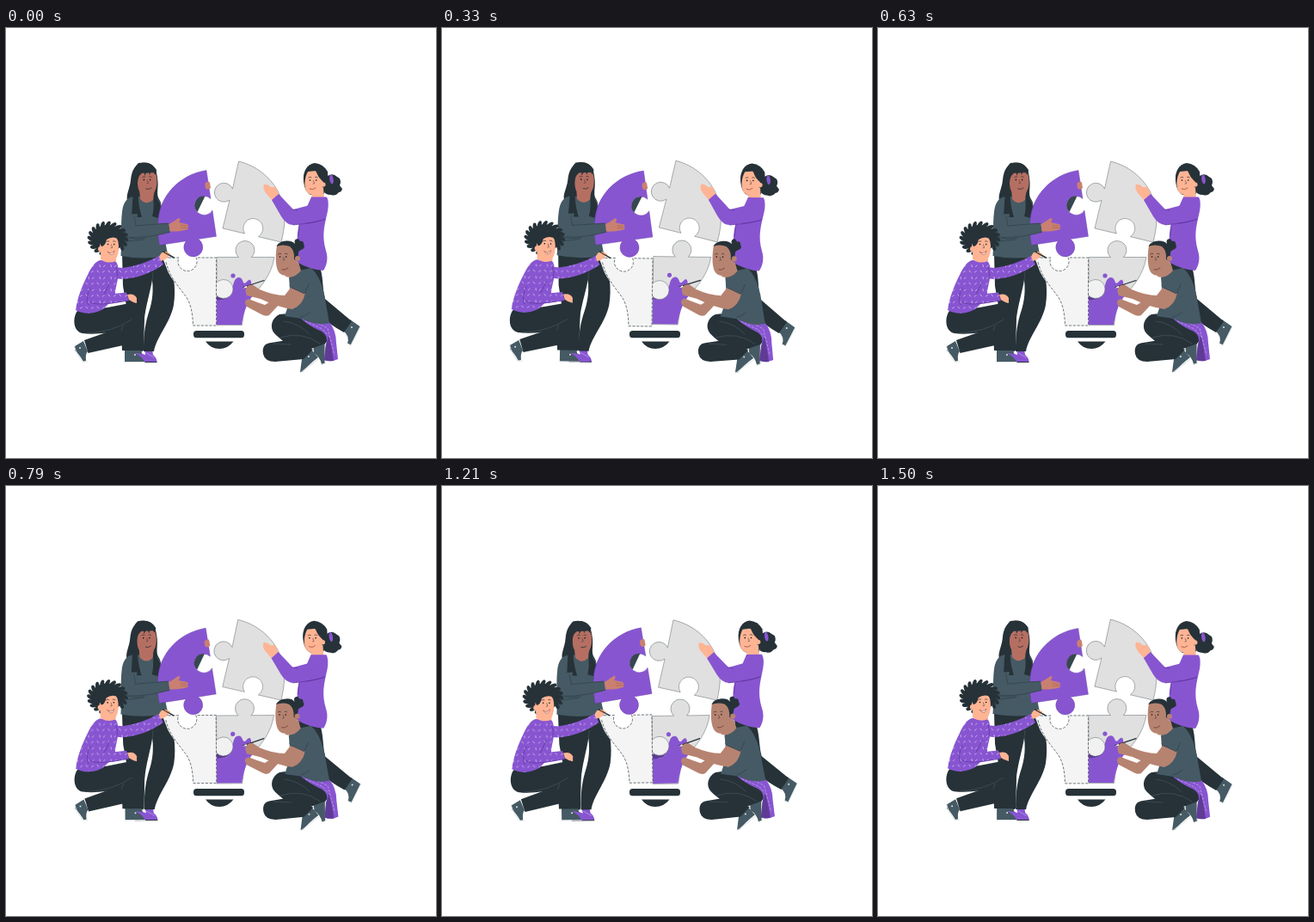
Recreate the animation shown at these times as an HTML page. Size 500 by 500 pixels, loop 1.54 s.

```html
<!DOCTYPE html>
<html lang="en">
<head>
<meta charset="utf-8">
<title>Team building a light bulb</title>
<style>
html, body { margin: 0; width: 100%; height: 100%; overflow: hidden; background: #fff; }
svg { display: block; width: 100vw; height: 100vh; }
.dark { fill: #263238; }
.slate { fill: #455a64; }
.purple { fill: #8855d1; }
.shade { fill: #5f3b96; }
.grey { fill: #e0e0e0; stroke: #59636a; stroke-width: .5; }
.paper { fill: #f4f4f4; }
.dash { fill: none; stroke: #37434a; stroke-width: .7; stroke-dasharray: 3.2 1.6; }
.line { fill: none; stroke: #263238; stroke-width: .8; stroke-linecap: round; stroke-linejoin: round; }
.fold { fill: none; stroke: #2c3c45; stroke-width: .6; stroke-linecap: round; }
.crease { fill: none; stroke: #5c359b; stroke-width: .7; stroke-linecap: round; }
.seam { fill: none; stroke: #536169; stroke-width: .5; stroke-linecap: round; }
.sole { fill: none; stroke: #dfe4e6; stroke-width: 1; stroke-linecap: round; }
.light { fill: #ffb494; }
.tan { fill: #b78371; }
.brown { fill: #b56f62; }
.hand { fill: #c98071; }
</style>
</head>
<body>
<svg viewBox="0 0 500 500" preserveAspectRatio="xMidYMid meet">
<defs>
  <pattern id="flecks" width="13" height="14" patternUnits="userSpaceOnUse">
    <rect width="13" height="14" fill="#8855d1"/>
    <path d="M2 2l1.6 2M8.5 4l1.8-1.2M5 9.5l.4 2.2M11 10l-1.6 1.6" stroke="#d9c6f4" stroke-width=".8" stroke-linecap="round"/>
  </pattern>
  <g id="eyes">
    <circle cx="-3.5" cy="0" r=".9"/><circle cx="5" cy="0" r=".9"/>
    <path class="line" d="M-5.5 -3.6q2-1.5 3.6-.5M3.6-4.2q1.8-1 3.2.4"/>
    <path class="line" d="M1.2 .5l1.3 4-1.8.4" style="stroke-width:.6"/>
  </g>
</defs>

<!-- standing woman with the purple quarter -->
<g data-pivot="189 273">
  <path class="purple" d="M150 378q6-2 9 1l14 5q3 2 2 4.500h-25z"/>
  <path class="purple" d="M161 374l9-1 1 7q4 3 4.500 8h-12z"/>
  <path class="sole" d="M151 381l12 4M163 378l9 5" style="stroke:#c9b1ee;stroke-width:.6"/>
  <path class="dark" d="M149 388h26.500v1H149z"/>
  <path class="dark" d="M135 262L187 263C195 281 198 303 195 322C191 343 175 359 172 376L160 376C160 360 161 348 165 334C169 322 172 310 170 293C168 306 162 324 160.500 342L159 376L149 376L136 300Z"/>
  <path class="seam" d="M170 293L171 284"/>
  <path class="dark" d="M161 156.500C150 157 146 166 145 177C144 188 138 195 142 203C146 207 145 213 147 220L182 221C180 211 182 205 178 199C174 193 178 186 176 174C175 163 171 156.500 161 156.500Z"/>
  <path class="slate" d="M148 196C140 197 136 204 135 214C133 230 135 247 133.500 265Q160 270 189 265C184 250 184 230 180 205C178 198 174 196 170 196Z"/>
  <path class="brown" d="M155 186L173 188L171 200Q163 207 156 199Z"/>
  <path class="brown" d="M154 169C152 180 153 189 157 192C162 198 171 196 174 188C176 182 176 176 174 168Z"/>
  <path class="dark" d="M154 157C146 164 147 181 148 188L146 220L158 220C155 210 153 199 154 190C152 182 153 176 155 172L161 165L161 172L165 165L167 171L169 165L174 171L175 165C171 158 163 155 154 157Z"/>
  <path class="dark" d="M174 188C169 197 174 206 170 219L181 222C181 212 180 204 176 199Z"/>
  <use href="#eyes" transform="translate(163.4 176.500) scale(.85)"/>
  <path class="line" d="M163 187q3.500 1.500 6-1"/>
  <path class="fold" d="M140 243Q149 247 162 244M142 248l18-2"/>

  <path class="purple" d="M233 165.500C201 170.500 178.500 196 177 224C175.500 233 177 244 178.500 252.500L209.500 247.800A11 11 0 1 0 223.500 245.600L244.500 242.300L240 212A11 11 0 1 1 238 198.500Z" stroke="#5f3aa5" stroke-width=".4"/>
  <path d="M231.500 195.400A11 11 0 0 0 222.500 214Z" fill="#37474f"/>
  <path class="hand" d="M232 180q4-3 5 0l1 6q-3 2.500-5.500 1q-2-4-.5-7z"/>

  <path class="slate" d="M137 217C135 230 137 240 144 243C158 245 176 241 191 237.500L189 227C176 227 163 229 151 230L153 216Z"/>
  <path class="fold" d="M151 230L189 227M149 219l2 11M144 243.500q20 1 46-6"/>
  <path class="hand" d="M189.500 228C194 226 197 223 201 221Q204 221 201 226L210 228Q213 229.500 211.500 232L212 234Q203 237 190.500 236.500Z"/>
  <path d="M203 229.500l7 .7M203 232.500l8-.3" stroke="#9f5f51" stroke-width=".6"/>
</g>

<!-- painted quarter, moves with the crouching man -->
<g data-pivot="314 323">
  <path class="grey" d="M245 266.500H270.500A11 11 0 1 1 285.500 266.500H312C309 286 297 301 284 314C277 323 276 335 274.500 345.500H245Z"/>
  <path class="purple" d="M245 315C252 318 260 315 262 307C264 302 264 294 268 291C273 288 275 293 276 296C279 299 281 291 284 293C287 296 283 301 287 304L288 310C278 322 276 334 274 345H245Z"/>
  <circle class="purple" cx="264" cy="288" r="2.600"/>
  <path class="shade" d="M245 311L262 306Q260 318 245 316Z"/>
</g>

<!-- socket -->
<rect class="dark" x="218" y="352" width="59" height="8.300" rx="3.500"/>
<path class="dark" d="M232 364.500H264.500Q258 373 248 373Q238 373 232 364.500Z"/>

<!-- kneeling woman with the sketched quarter -->
<g data-pivot="170 307">
  <path class="paper" d="M182 267L201 267A11 11 0 1 0 221 267L244.500 267V346H217.500C217 332 215 320 209 312C202 302 190 290 187 280Z"/>
  <path class="grey" style="fill:#f1f1f1" d="M244.500 296.500A11 11 0 1 1 244.500 310.500"/>
  <path d="M201 267A11 11 0 1 0 221 267Z" fill="#fff"/>
  <path class="dash" d="M184 267H201A11 11 0 1 0 221 267H244.500V346H217.500C217 332 215 320 209 312C202 302 190 290 186 272"/>

  <path class="slate" d="M80 370L90 364L95 376Q92 379 93 387L90 388Q85 379 80 375Z"/>
  <path class="sole" d="M79.500 370Q81 378 89 388H94.500"/>
  <circle cx="86" cy="372" r="1" fill="#dfe4e6"/>
  <path class="slate" d="M138 374H157Q158 381 162 388H138Z"/>
  <path class="sole" d="M138 388.500H161"/>
  <circle cx="150" cy="380" r="1" fill="#dfe4e6"/>
  <path class="purple" d="M150 378q8 0 11 3l9 4q2 1.500 2 3h-11q-3-6-11-10z"/>
  <path class="dark" d="M142 345L91 363L95.500 378L145 367Z"/>
  <path class="dark" d="M83 329C77 337 78 353 89 355C104 357 120 354 134 352L135 375H160L161 335C161 323 155 318 149 319L118 325Z"/>
  <path class="seam" d="M94 355Q123 354 146 339M134 352l2-6"/>
  <path fill="url(#flecks)" d="M126 278L136 279Q158 276 178 265L183 275Q160 291 134 292L126 291Z"/>
  <path fill="url(#flecks)" d="M109 270C102 273 99 279 95 287C89 299 83 313 81 328Q96 336 113 327L127 313C126 302 132 292 130 283Q131 274 127 271Z"/>
  <path fill="url(#flecks)" d="M103 286C95 296 93 309 97 318C102 325 126 320 143 317L140 307.500L114 310L121 294Z"/>
  <path class="crease" d="M114 310L121 296M97 318C104 324 124 320 142 317M128 278q3 6 1 13M96 322q-4-9 2-20"/>
  <path class="light" d="M141 310Q149 308 152 314L152 320Q147 319 143 316Z"/>
  <path class="light" d="M178 266Q181 259 186 260L191 263Q188 268 183 270L180 271Z"/>
  <path d="M183 260L195 267" stroke="#263238" stroke-width="1.500" stroke-linecap="round"/>
  <path d="M185 260.500l6 2.800" stroke="#e8995f" stroke-width="1.200"/>
  <g class="dark" id="curls"></g>
  <path class="light" d="M110 261L110 269Q118 275 128 271L128 264Z"/>
  <path class="light" d="M110 248C115 240 127 239 130 247C132 254 131 264 128 268Q122 273 113 267Q107 260 110 248Z"/>
  <path class="dark" d="M107 246Q114 235 131 241L133 246Q124 241 117 246Q115 254 111 254Z"/>
  <circle class="light" cx="110" cy="257" r="3"/>
  <use href="#eyes" transform="translate(121.500 251.500) scale(.85)"/>
  <path d="M118 260q5 4 8-1q-1 6-5 4z" fill="#fff" stroke="#9b4c43" stroke-width=".6"/>
</g>

<!-- woman lifting the grey quarter -->
<g data-pivot="327 262">
  <path class="slate" d="M400 339L411.500 347L401 368.500L397 367Q400 358 392 352Z"/>
  <path class="sole" d="M412 347.500L401 369L397 367"/>
  <circle cx="402" cy="348" r="1" fill="#dfe4e6"/>
  <path class="dark" d="M340 272L366 281C369 293 368 304 371 315L402 341L393 354Q375 344 362 332L342 294Z"/>
  <path class="dark" d="M359 157C350 158 345 167 346 178C347 187 350 193 355 194L369 194Q376 183 374 167Q369 158 359 157Z"/>
  <path class="dark" d="M374 172Q380 168 385 173L388 175Q390 179 388 183L391 187Q390 191 387 191Q383 196 378 194Q370 194 369 188Q374 184 373 179Z"/>
  <ellipse class="purple" cx="378.500" cy="176" rx="2.200" ry="5.500" transform="rotate(-8 378 176)"/>
  <path class="light" d="M356 188L369 185L370 199H355Z"/>
  <path class="light" d="M351 167C347 174 346 185 350 191Q355 196 362 193Q368 190 369 179Q364 175 361 166Z"/>
  <path class="dark" d="M347 181Q346 172 350 166Q359 161 362 170Q365 177 370 177L371 166Q361 157 352 162Q344 168 347 181Z"/>
  <circle class="light" cx="369" cy="182" r="2.600"/>
  <use href="#eyes" transform="translate(356.500 177) scale(.85)"/>
  <path class="line" d="M353 187q4 2 7-1" style="stroke:#9b4c43"/>
  <path class="purple" d="M355 196.500L373 196.500Q376 202 374 213C370 231 367 241 372 259C375 268 373 276 369 282Q353 281 338 272C341 259 336 246 341 228Z"/>
  <path class="grey" d="M270.500 155C300 162 324 188 324 221C324 231 322 241 320 249L293.500 242.700A11.500 11.500 0 1 0 277.500 239L252 233L260 200A11 11 0 1 1 263.500 187Z"/>
  <path class="light" d="M310 201L303 193Q298 187 300 182Q304 181 308 185L314 185Q315 190 318 195Z"/>
  <path class="purple" d="M309 200L317 193L334 211L357 205Q369 204 371 214Q372 224 361 226L334 229Q326 229 320 219Z"/>
  <path class="crease" d="M333 211l6 1M334 229Q352 228 370 223M371 222q-8 4-22 5M341 229l-1 13"/>
</g>

<!-- crouching man -->
<g data-pivot="314 323">
  <path class="slate" d="M357 366L371 365L371 390L367 391Q365 382 358 378Z"/>
  <path class="sole" d="M367 391.500L371 390V368"/>
  <path class="slate" d="M345 378L356 375L363 383Q351 392 345 400L342 400Z"/>
  <path class="sole" d="M342.500 401L363 385"/>
  <circle cx="352" cy="382" r="1" fill="#dfe4e6"/>
  <path class="dark" d="M308 366Q297 367 299 379Q301 388 313 388L346 385L357 374L333 362Z"/>
  <path class="dark" d="M318 333C309 337 306 348 312 355C319 362 330 371 344 377L371 367Q380 359 376 350L355 338Q335 330 318 333Z"/>
  <path class="seam" d="M319 360Q344 352 365 367M323 341q18 2 30 15M311 367l20 1"/>
  <path class="purple" d="M341 336L376 342Q384 352 384 366L386 385Q378 389 370 386L372 368Q376 356 363 351Q350 345 341 336Z"/>
  <path class="shade" d="M375 356Q379 372 381 387Q375 388 370 386L372 368Q375 362 375 356Z"/>
  <path d="M348 341L368 350L377 360M358 341L374 349L382 380" fill="none" stroke="#d2bdf1" stroke-width=".6" stroke-dasharray="3 1.500"/>
  <path class="tan" d="M282 315Q292 319 301 322L312 315L318 321L306 334Q302 336 297 333L280 324Q275 317 282 315Z"/>
  <path class="slate" d="M329 290L341 282L355 279Q365 288 370 309L376 343Q362 347 344 338L324 335Q330 320 330 302Z"/>
  <path class="tan" d="M331 302L348 308Q345 323 333 327Q317 325 296 315L280 311Q277 304 280 301L286 298L295 304Q311 311 324 311Z"/>
  <path class="slate" d="M335 293Q326 300 332 302L347 309Q352 299 347 290Z"/>
  <path class="fold" d="M332 302L347 309L352 298M354 330q-5 5-11 6"/>
  <path d="M276 301.500L300 293.500" stroke="#263238" stroke-width="1.300" stroke-linecap="round"/>
  <path d="M275.500 302.500l4-2.800 1 2z" fill="#fff"/>
  <path class="tan" d="M280 301Q284 297 288 300L293 304L284 310Q278 308 280 301Z"/>
  <path class="tan" d="M325 281L340 272L343 282Q335 292 325 289Z"/>
  <path class="tan" d="M315 253C313 265 313 279 318 285Q324 291 332 284Q340 278 339 265L335 251Q324 247 315 253Z"/>
  <path class="dark" d="M314.500 254Q317 248 326 247.500Q333 247 336 251Q334 245 340 245L342 248Q346 247 346 251Q349 256 343 258Q340 259 340 262L339 271L335 269Q336 259 330 254Q322 251 314.500 254Z"/>
  <circle class="tan" cx="339" cy="268" r="3"/>
  <use href="#eyes" transform="translate(321.500 266) scale(.85)"/>
  <path class="line" d="M321 281q4 1 7-2" style="stroke:#6d3c32"/>
</g>
</svg>
<script>
const LOOP = 1540, PEAK = 315, SWING = 1; // ms, ms, degrees
const NS = "http://www.w3.org/2000/svg";
const curls = document.getElementById("curls");
const groups = [...document.querySelectorAll("[data-pivot]")];

function blob(x, y, rx, ry, turn) {
  const e = document.createElementNS(NS, "ellipse");
  const attrs = { cx: x, cy: y, rx, ry, transform: `rotate(${turn} ${x} ${y})` };
  for (const [k, v] of Object.entries(attrs)) e.setAttribute(k, v);
  curls.appendChild(e);
}

// Curly hair: a core ringed by small slanted lobes.
blob(118, 245, 19, 16, 0);
for (let i = 0; i < 20; i++) {
  const a = i / 20 * Math.PI * 2;
  if (a > 0.75 && a < 1.75) continue;
  blob(118.5 + 20 * Math.cos(a), 245 + 16.5 * Math.sin(a), 4.4, 2.2, a * 180 / Math.PI + 35);
}

// Triangle wave: 1 at PEAK, -1 half a loop later.
function wave(t) {
  const p = (((t - PEAK) / LOOP) % 1 + 1) % 1;
  return Math.abs(p - 0.5) * 4 - 1;
}
const rest = wave(0);

function draw(t) {
  const turn = SWING * (wave(t) - rest);
  for (const g of groups) g.setAttribute("transform", `rotate(${turn} ${g.dataset.pivot})`);
}

function tick(now) {
  draw(now % LOOP);
  requestAnimationFrame(tick);
}
draw(0);
requestAnimationFrame(tick);
</script>
</body>
</html>
```
